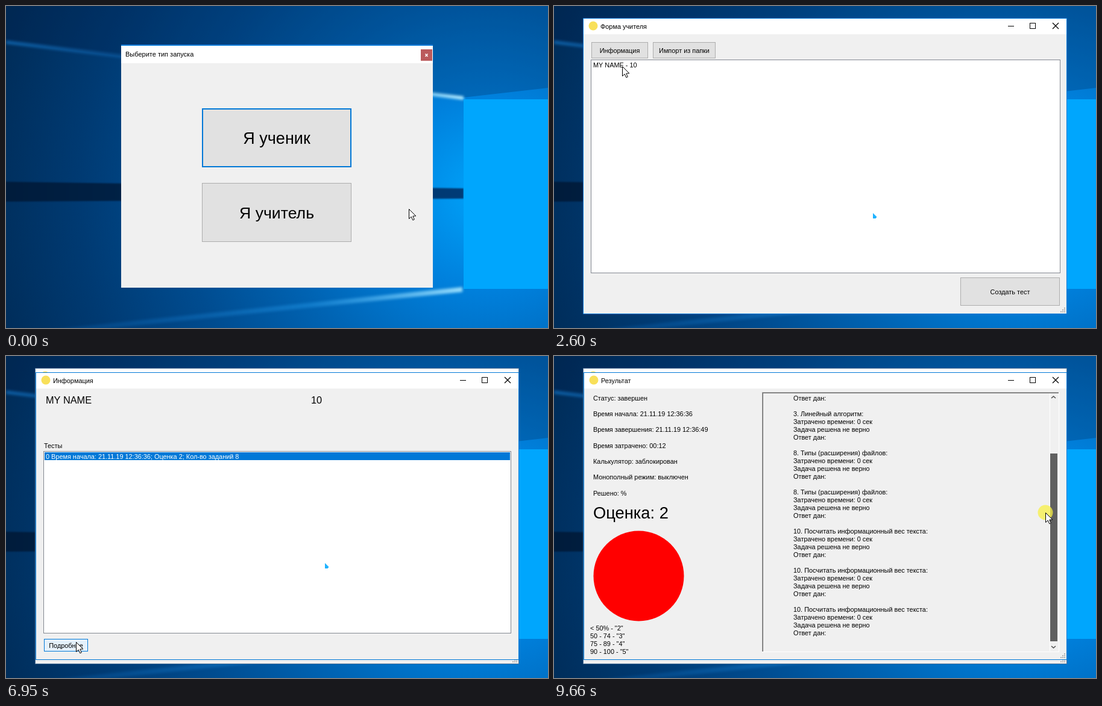
Recreate the animation shown at these times as an HTML page with a canvas. Size 899 by 535 pixels, loop 9740 ms.

```html
<!DOCTYPE html>
<html lang="ru">
<head>
<meta charset="utf-8">
<title>Тесты</title>
<style>
html, body { margin: 0; width: 100%; height: 100%; overflow: hidden; background: #00305f; }
canvas { display: block; }
</style>
</head>
<body>
<canvas id="stage" width="899" height="535"></canvas>
<script>
const W = 899, H = 535, LOOP = 9740;
const FONT = '"Liberation Sans", Arial, sans-serif';
const BLUE = '#0078d7', FACE = '#f0f0f0';
const LEAVE = 1130, TEACHER = 1360, INFO = 4090, RESULT = 7110;
const TRAVEL = 750, PAUSE = 150, PRESS = 200;
const AWAY = { x: 0, y: 0 };

// where the pointer comes to rest, and what it presses there
const STOPS = [
  { at: 960, x: 528, y: 341, press: PRESS },
  { at: 2600, x: 113, y: 100, press: PRESS },
  { at: 3600, x: 105, y: 74, press: PRESS },
  { at: 5000, x: 198, y: 146 },
  { at: 5400, x: 112, y: 166, press: PRESS },
  { at: 6590, x: 116, y: 475, press: PRESS },
  { at: 8260, x: 857, y: 192 },
  { at: 8530, x: 826, y: 174, press: LOOP },
  { at: 9650, x: 815, y: 260 }
];
const [, pickName, , , pickTest, , , grab] = STOPS.map(s => s.at + PAUSE);

const screen = document.getElementById('stage').getContext('2d');
const makeLayer = () => {
  const c = document.createElement('canvas');
  c.width = W;
  c.height = H;
  return c.getContext('2d');
};
const wall = makeLayer(), layer = makeLayer();
let g = screen;

const clamp = v => Math.max(0, Math.min(1, v));
const easeOut = k => 1 - (1 - k) ** 3;

function pointerAt(t) {
  let from = { at: 260 - 50, x: 668, y: 337 };
  for (const to of STOPS) {
    if (t < to.at) {
      const start = Math.max(from.at + 50, to.at - TRAVEL);
      const k = easeOut(clamp((t - start) / (to.at - start)));
      return { x: Math.round(from.x + (to.x - from.x) * k), y: Math.round(from.y + (to.y - from.y) * k) };
    }
    from = to;
  }
  return from;
}
const pressed = t => STOPS.some(s => s.press && t >= s.at + PAUSE && t < s.at + PAUSE + s.press);

function rect(x, y, w, h, fill) {
  g.fillStyle = fill;
  g.fillRect(x, y, w, h);
}
function box(x, y, w, h, fill, edge, line = 1) {
  rect(x, y, w, h, edge);
  rect(x + line, y + line, w - 2 * line, h - 2 * line, fill);
}
function poly(pts, fill, edge) {
  g.beginPath();
  pts.forEach(([x, y]) => g.lineTo(x, y));
  g.closePath();
  g.fillStyle = fill;
  g.fill();
  if (!edge) return;
  g.strokeStyle = edge;
  g.lineWidth = 1;
  g.stroke();
}
function disc(x, y, r, fill) {
  g.beginPath();
  g.arc(x, y, r, 0, 7);
  g.fillStyle = fill;
  g.fill();
}
function line(pts, color, width) {
  g.beginPath();
  pts.forEach(([x, y]) => g.lineTo(x, y));
  g.strokeStyle = color;
  g.lineWidth = width;
  g.stroke();
}
function cross(x, y, rx, ry, color, width) {
  for (const s of [-1, 1]) line([[x - rx, y - ry * s], [x + rx, y + ry * s]], color, width);
}
// y is the middle of the capitals
function text(s, x, y, size = 10.9, color = '#000', align = 'left') {
  g.font = size + 'px ' + FONT;
  g.textAlign = align;
  g.fillStyle = color;
  g.fillText(s, x, Math.round(y + size * 0.35));
}
function button(s, x, y, w, h, ptr, { off, main, size } = {}) {
  const hot = !off && ptr.x >= x && ptr.x < x + w && ptr.y >= y && ptr.y < y + h;
  const fill = off ? '#cccccc' : hot ? '#e5f1fb' : '#e1e1e1';
  const edge = off ? '#bfbfbf' : hot || main ? BLUE : '#adadad';
  box(x, y, w, h, fill, edge, main ? 2 : 1);
  text(s, x + w / 2, y + h / 2 + 0.5, size, off ? '#979797' : '#000', 'center');
}

function blend(gradient, ...colors) {
  colors.forEach((c, i) => gradient.addColorStop(i / (colors.length - 1), c));
  return gradient;
}
// a wedge of light running from the left edge to a bright end
function ray(y0, x1, y1, half, ...colors) {
  poly([[0, y0 - half], [x1, y1 - half], [x1, y1 + half], [0, y0 + half]],
    blend(g.createLinearGradient(0, 0, x1, 0), ...colors));
}

function paintWall() {
  g = wall;
  g.save();
  g.translate(800, 310);
  g.scale(1, 0.95);
  g.fillStyle = blend(g.createRadialGradient(0, 0, 0, 0, 0, 850),
    '#00a4fb', '#0080dc', '#0064b4', '#004c90', '#003a72', '#002c58');
  g.fillRect(-800, -350, W, 700);
  g.restore();
  poly([[0, 0], [W, 0], [W, 136], [759, 152], [0, 60]], 'rgba(0,28,70,.24)');
  g.filter = 'blur(2px)';
  ray(60, 759, 153, 3, 'rgba(20,125,210,.6)', 'rgba(30,130,215,.2)', 'rgba(40,160,240,.3)', 'rgba(190,240,255,.95)');
  ray(549, 757, 471, 4, 'rgba(10,110,200,.1)', 'rgba(20,125,210,.3)', 'rgba(40,160,240,.4)', 'rgba(170,232,255,.9)');
  g.filter = 'blur(1px)';
  poly([[-5, 292], [759, 303], [759, 320], [-5, 325]],
    blend(g.createLinearGradient(0, 0, 759, 0), '#001c3c', '#00264e', '#003c78'));
  g.filter = 'none';
  rect(759, 155, 315, 315, '#00a6fd');
  g = screen;
}

function launcher(ptr) {
  rect(191, 64, 517, 404, FACE);
  rect(191, 66, 517, 29, '#fff');
  rect(191, 64, 517, 2, BLUE);
  text('Выберите тип запуска', 198, 80, 11);
  rect(688, 72, 19, 19, '#bb5a5c');
  cross(697.5, 81.75, 2, 2.25, '#fff', 1.5);
  button('Я ученик', 325, 170, 248, 98, AWAY, { main: true, size: 27 });
  button('Я учитель', 325, 294, 248, 98, ptr, { size: 26.67 });
}

function grip(x, y) {
  for (let r = 0; r < 3; r++)
    for (let c = 0; c <= r; c++) rect(x - c * 3, y - (2 - r) * 3, 2, 2, '#b0b0b0');
}

function frame(title, x, y, w, h, edge) {
  box(x, y, w, h, FACE, edge);
  rect(x + 1, y + 1, w - 2, 26, '#fff');
  disc(x + 17, y + 13, 7.5, '#f8e05a');
  text(title, x + 29, y + 14);
  const m = y + 13;
  rect(753, m, 10, 1, '#000');
  box(789, m - 5, 10, 10, '#fff', '#000');
  cross(832, m, 5, 5, '#000', 1.2);
}

function listRow(s, x, y, w, picked) {
  if (picked) rect(x, y, w, 13, BLUE);
  text(s, x + 2, y + 7, 10.9, picked ? '#fff' : '#000');
}

function teacherForm(t, ptr) {
  const live = t < INFO, p = live ? ptr : AWAY;
  frame('Форма учителя', 48, 20, 803, 492, live ? BLUE : '#4a7299');
  button('Информация', 62, 60, 94, 27, p);
  button('Импорт из папки', 164, 60, 104, 27, p);
  box(61, 89, 779, 355, '#fff', '#828790');
  listRow('MY NAME - 10', 63, 91, 775, t >= pickName);
  button('Создать тест', 674, 451, 165, 47, p);
  grip(846, 507);
}

function infoForm(t, ptr) {
  frame('Информация', 49, 27, 802, 478, BLUE);
  text('MY NAME', 66, 73, 16.3);
  text('10', 506, 73, 16.3);
  text('Тесты', 63, 149);
  box(62, 158, 776, 303, '#fff', '#828790');
  const picked = t >= pickTest;
  listRow('0 Время начала: 21.11.19 12:36:36; Оценка 2; Кол-во заданий 8', 64, 160, 772, picked);
  button('Подробнее', 63, 470, 73, 21, ptr, { off: !picked });
}

const TASKS = [
  '1. Перевод между 10-ой и 2-ой сс:', '2. Единицы измерения информации:',
  '3. Линейный алгоритм:', '8. Типы (расширения) файлов:', '8. Типы (расширения) файлов:',
  ...Array(3).fill('10. Посчитать информационный вес текста:')
];
const REPORT = TASKS.flatMap(s => [s, 'Затрачено времени: 0 сек', 'Задача решена не верно', 'Ответ дан:', '']);
const FACTS = [
  'Статус: завершен', 'Время начала: 21.11.19 12:36:36', 'Время завершения: 21.11.19 12:36:49',
  'Время затрачено: 00:12', 'Калькулятор: заблокирован', 'Монополный режим: выключен', 'Решено: %'
];
const MARKS = ['< 50% - "2"', '50 - 74 - "3"', '75 - 89 - "4"', '90 - 100 - "5"'];

function resultForm(t, ptr) {
  frame('Результат', 49, 27, 802, 478, BLUE);
  FACTS.forEach((s, i) => text(s, 65, 70 + 26.3 * i));
  text('Оценка: 2', 65, 260, 27.3);
  disc(140.5, 365.5, 75, '#f00');
  MARKS.forEach((s, i) => text(s, 60, 452 + 13 * i));
  grip(846, 500);

  ['#fff', '#a0a0a0', '#696969', FACE].forEach((c, i) => {
    const inset = Math.max(0, i - 1);
    rect(345 + inset, 60 + inset, 493 - (i > 0) - inset, 432 - (i > 0) - inset, c);
  });
  const drag = t >= grab;
  const k = drag ? clamp((ptr.y - 174) / 86) : 0;
  const top = 70 - Math.round(117 * k);
  g.save();
  g.beginPath();
  g.rect(347, 63, 475, 427);
  g.clip();
  text('Краткая информация:', 348, top);
  rect(348, top - 7, 1, 13, '#000');
  REPORT.forEach((s, i) => text(s, 397, top + 13 * (i + 1)));
  g.restore();

  rect(822, 62, 1, 428, '#fff');
  rect(823, 76 + Math.round(86 * k), 12, 312, drag ? '#606060' : '#cdcdcd');
  for (const s of [-1, 1]) {
    const y = 276 + 206 * s;
    line([[825, y], [828.5, y + 3 * s], [832, y]], '#505050', 1.6);
  }
}

// shows a whole window as one translucent, scaled sheet
function sheet(paint, alpha, scale) {
  if (alpha >= 1) return paint();
  g = layer;
  g.clearRect(0, 0, W, H);
  paint();
  g = screen;
  g.save();
  g.globalAlpha = alpha;
  g.translate(449.5, 266);
  g.scale(scale, scale);
  g.drawImage(layer.canvas, -449.5, -266);
  g.restore();
}
function opening(t, start, paint) {
  if (t < start) return;
  const k = easeOut(Math.min(1, Math.floor((t - start) / 70) / 2));
  sheet(paint, 0.5 + 0.5 * k, 0.974 + 0.026 * k);
}

function pointer({ x, y }, resizing) {
  g.save();
  g.translate(x + 0.5, y + 0.5);
  if (resizing) {
    const half = s => [[6, -1.5], [6, -5], [11, 0], [6, 5], [6, 1.5]].map(([a, b]) => [a * s, b * s]);
    poly([...half(1), ...half(-1)], '#fff', '#000');
  } else {
    poly([[0, 0], [0, 16], [3.7, 12.6], [6.3, 18.3], [8.8, 17.2], [6.3, 11.6], [11.3, 11.4]], '#fff', '#000');
  }
  g.restore();
}

function draw(t) {
  const ptr = pointerAt(t);
  g.drawImage(wall.canvas, 0, 0);
  if (t < LEAVE + 60) sheet(() => launcher(ptr), t < LEAVE ? 1 : 0.45, 0.97);
  opening(t, TEACHER, () => teacherForm(t, ptr));
  opening(t, INFO, () => infoForm(t, ptr));
  opening(t, RESULT, () => resultForm(t, ptr));
  if (pressed(t)) disc(ptr.x, ptr.y, 12.5, 'rgba(248,240,70,.75)');
  pointer(ptr, t > RESULT && ptr.x > 845);
  // speck left behind by the first click
  if (t >= LEAVE && t < RESULT) poly([[529, 344], [535.5, 350.5], [533.5, 353], [529, 353]], '#1fb2ff');
}

paintWall();
const begin = performance.now();
function tick() {
  draw((performance.now() - begin) % LOOP);
  requestAnimationFrame(tick);
}
tick();
</script>
</body>
</html>
```
